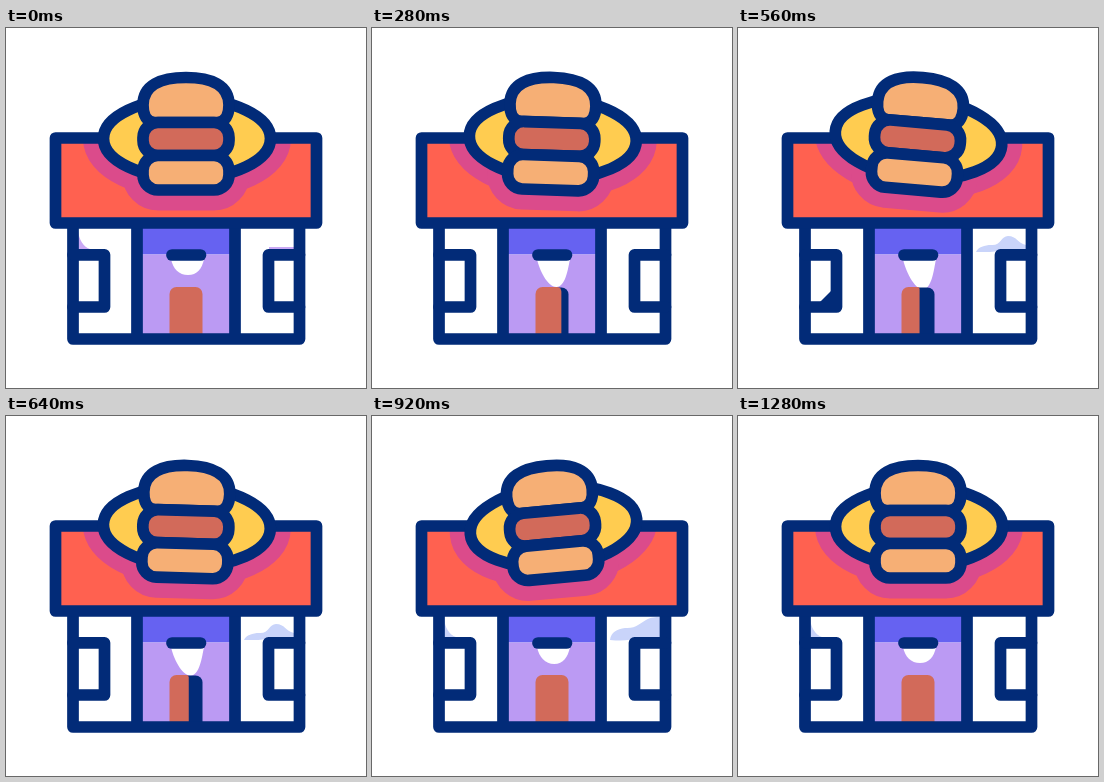
Recreate the animation shown at these times as an HTML page with a canvas. Size 360 px wide and 360 px high, loop 1480 ms.

```html
<!DOCTYPE html>
<html lang="en">
<head>
<meta charset="utf-8">
<title>Hot dog shop</title>
<style>
  html, body { margin: 0; width: 100%; height: 100%; overflow: hidden; background: #fff; }
  canvas { display: block; width: 360px; height: 360px; }
</style>
</head>
<body>
<canvas id="stage" width="360" height="360"></canvas>
<script>
const ctx = document.getElementById('stage').getContext('2d');
const LOOP = 1480, STEP = 40;
const NAVY = '#022b78', RED = '#ff6150', PINK = '#db4b8b', YELLOW = '#ffcc50';
const BUN = '#f6af75', SAUSAGE = '#d26a5a', BLUE = '#6662f1', LILAC = '#bb9af3', GLASS = '#c9d4fa';

const clamp = v => Math.min(1, Math.max(0, v));
const ease = p => p < 0.5 ? 4 * p ** 3 : 1 - 4 * (1 - p) ** 3;
const ramp = (t, from, to) => ease(clamp((t - from) / (to - from)));
const hump = (t, from, to) => Math.sin(Math.PI * clamp((t - from) / (to - from)));
const during = (t, from, to) => t >= from && t < to;

function fill(path, color) {
  ctx.fillStyle = color;
  ctx.fill(path);
}

function outline(path, color = NAVY, width = 11.7) {
  ctx.strokeStyle = color;
  ctx.lineWidth = width;
  ctx.stroke(path);
}

function box(x, y, w, h, r = 0) {
  const path = new Path2D();
  path.roundRect(x, y, w, h, r);
  return path;
}

const walls = new Path2D('M67 195V311H293.5V195M131 195V311M229 195V311');
const roof = box(49.5, 110, 261, 85);
const lamp = new Path2D('M166 227H194.5');
const windows = new Path2D('M67 226.8H98.5V279H67M293.5 226.8H262.5V279H293.5');

const plate = new Path2D();
plate.ellipse(181, 110.5, 83.5, 40, 0, 0, Math.PI * 2);
const topBun = new Path2D(
  'M149 94.5C141 94.5 137 87 137 77C137 57 155 49.5 180 49.5S223 57 223 77C223 87 219 94.5 211 94.5Z');
const sausage = box(137, 94.5, 86, 33, 15);
const lowBun = box(137, 127.5, 86, 34.5, 15);

const leftGlint = new Path2D('M72 203C73 211 77 219 84 221H72Z');
const thinGlint = new Path2D('M263 219H288V221H263Z');
const highCloud = new Path2D(
  'M238 224C239 216 245 213 253 212C264 213 268 207 274 204C279 201 284 201 288 201V221H266C258 225 249 225 238 224Z');
const lowCloud = new Path2D(
  'M238 224C240 219 247 217 253 217C263 218 263 208 270 208C279 208 279 215 288 217V221H265C257 225 248 224 238 224Z');
const cloudTraces = new Path2D('M246 222H251V224H246ZM269 220H288V222H269Z');

function turnSign(t) {
  const angle = 5.5 * (ramp(t, 120, 480) - 2 * ramp(t, 480, 840) + ramp(t, 840, 1200));
  ctx.translate(181, 105);
  ctx.rotate(angle * Math.PI / 180);
  ctx.translate(-181, -105);
}

function drawGlass(t) {
  if (t < 240 || t >= 880) fill(leftGlint, t < 80 ? '#c9a8f5' : t < 240 ? '#dedcf8' : GLASS);
  if (t < 240) fill(thinGlint, t < 80 ? '#c9a8f5' : '#e4e1fa');
  if (during(t, 320, 480) || during(t, 840, 1040)) fill(highCloud, GLASS);
  if (during(t, 480, 680)) fill(lowCloud, GLASS);
  if (during(t, 680, 840)) fill(cloudTraces, GLASS);
}

function drawEntrance(t) {
  fill(box(131, 195, 98, 31.5), BLUE);
  fill(box(131, 226.5, 98, 84), LILAC);

  const glow = hump(t, 0, 940);
  const end = 247 + 15 * glow, tip = 182 + 3 * glow;
  fill(new Path2D(
    `M165 231C167 241 ${tip - 9} ${end} ${tip} ${end}S196 241 198 231Z`), '#fff');

  const gap = 15 * hump(t, 160, 920);
  if (gap > 0.5) fill(box(175, 259.5, 21.5, 48, [0, 7, 0, 0]), NAVY);
  fill(box(163.5, 259, 33 - gap, 48, [7, 7 - gap / 3, 0, 0]), SAUSAGE);
}

function drawSign(t) {
  ctx.save();
  ctx.clip(roof);
  turnSign(t);
  for (const shape of [plate, lowBun]) outline(shape, PINK, 41);
  ctx.restore();
  outline(roof);

  ctx.save();
  turnSign(t);
  fill(plate, YELLOW);
  outline(plate);
  for (const [shape, color] of [[topBun, BUN], [sausage, SAUSAGE], [lowBun, BUN]]) {
    fill(shape, color);
    outline(shape);
  }
  ctx.restore();
}

function draw(t) {
  ctx.fillStyle = '#fff';
  ctx.fillRect(0, 0, 360, 360);
  ctx.lineCap = ctx.lineJoin = 'round';

  drawGlass(t);
  drawEntrance(t);
  for (const path of [walls, windows, lamp]) outline(path);
  if (during(t, 520, 640)) fill(new Path2D('M81 275L94 262V275Z'), NAVY);

  fill(roof, RED);
  drawSign(t);
}

const start = performance.now();
function tick() {
  const t = (performance.now() - start) % LOOP;
  draw(Math.min(1280, Math.floor(t / STEP) * STEP));
  requestAnimationFrame(tick);
}
tick();
</script>
</body>
</html>
```
